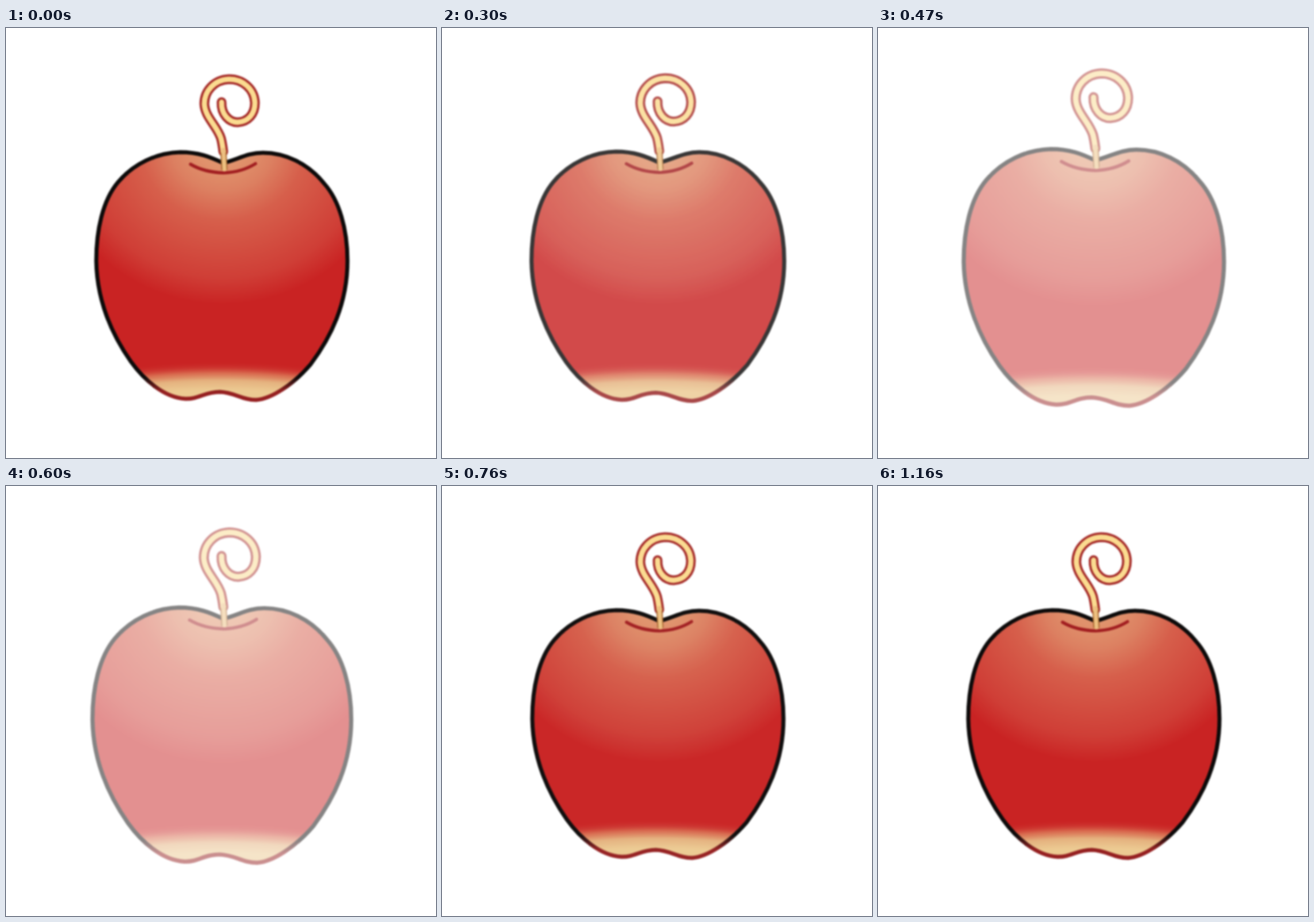
Recreate the animation shown at these times as an HTML page. Size 748 px wide and 748 px high, loop 1190 ms.

```html
<!DOCTYPE html>
<html lang="en">
<head>
<meta charset="utf-8">
<title>Pulsing apple</title>
<style>
  html, body { margin: 0; height: 100%; overflow: hidden; background: #fff; }
  svg { display: block; width: 100%; height: 100%; }
</style>
</head>
<body>
<svg viewBox="0 0 748 748" fill="none" stroke-linecap="round" stroke-linejoin="round">
  <defs>
    <filter id="soft" filterUnits="userSpaceOnUse" x="0" y="0" width="748" height="748"
            color-interpolation-filters="sRGB">
      <feGaussianBlur stdDeviation="1.4"/>
    </filter>
    <radialGradient id="shine" gradientUnits="userSpaceOnUse" cx="0" cy="0" r="1"
                    gradientTransform="translate(377 200) scale(300 280)">
      <stop offset=".15" stop-color="#e0926c"/>
      <stop offset=".3" stop-color="#dc8061"/>
      <stop offset=".48" stop-color="#d65f4b"/>
      <stop offset=".84" stop-color="#cf3e36"/>
      <stop offset="1" stop-color="#c92323"/>
    </radialGradient>
    <radialGradient id="base" gradientUnits="userSpaceOnUse" cx="372" cy="1900" r="1320">
      <stop offset=".962" stop-color="#ecca92"/>
      <stop offset=".975" stop-color="#e4b17e"/>
      <stop offset=".985" stop-color="#dc7c59" stop-opacity=".8"/>
      <stop offset=".992" stop-color="#d0453a" stop-opacity=".5"/>
      <stop offset="1" stop-color="#c92323" stop-opacity="0"/>
    </radialGradient>
    <linearGradient id="edge" gradientUnits="userSpaceOnUse" x1="0" y1="608" x2="0" y2="632">
      <stop offset="0" stop-color="#0c0a0a"/>
      <stop offset="1" stop-color="#951f20"/>
    </linearGradient>
    <path id="body" d="M378 235C355 224 335 216 303 216C262 217 222 236 195 268C168 300 157 352 157 405
      C158 470 182 530 217 580C240 612 275 643 312 645C335 646 345 633 372 633C398 634 410 647 435 647
      C462 645 500 620 530 585C565 538 594 480 594 405C594 350 580 300 553 270C525 235 485 217 447 217
      C420 217 405 228 378 235Z"/>
    <path id="curl" d="M375 129C374 150 388 164 403 164C421 163 433 150 433 130C432 106 412 89 388 89
      C362 90 345 110 345 132C346 155 367 170 374 192C376 200 377 207 378 215"/>
  </defs>
  <g id="apple"><g filter="url(#soft)">
    <use href="#body" fill="url(#shine)"/>
    <use href="#body" fill="url(#base)" stroke="url(#edge)" stroke-width="7"/>
    <path d="M321 237Q345 251 378 252Q410 251 434 236" stroke="#a11d20" stroke-width="5.5"/>
    <use href="#curl" stroke="#a52a28" stroke-width="17"/>
    <path d="M378 212L380 247" stroke="#a8672f" stroke-width="11" stroke-linecap="butt"/>
    <use href="#curl" stroke="#fbdc90" stroke-width="9"/>
    <path d="M378 212L380 246" stroke="#edc080" stroke-width="7"/>
  </g></g>
</svg>
<script>
  const LOOP = 1190, STEP = 100 / 3;
  const apple = document.getElementById('apple');
  const clamp = v => Math.max(0, Math.min(1, v));

  function draw(now) {
    const step = Math.floor((now % LOOP + 7) / STEP);
    const depth = Math.min(step - 8, 23 - step); // steps into the pulse, negative at rest
    const scale = 1 + 0.042 * clamp(depth / 7);
    const opacity = depth > 0 ? 0.98 - 0.48 * clamp(depth / 3) : Math.min(1, 0.98 - depth * 0.0025);
    apple.setAttribute('transform', `translate(376 367) scale(${scale}) translate(-376 -367)`);
    apple.setAttribute('opacity', opacity);
  }

  const start = performance.now();
  function tick() {
    draw(performance.now() - start);
    requestAnimationFrame(tick);
  }
  tick();
</script>
</body>
</html>
```
